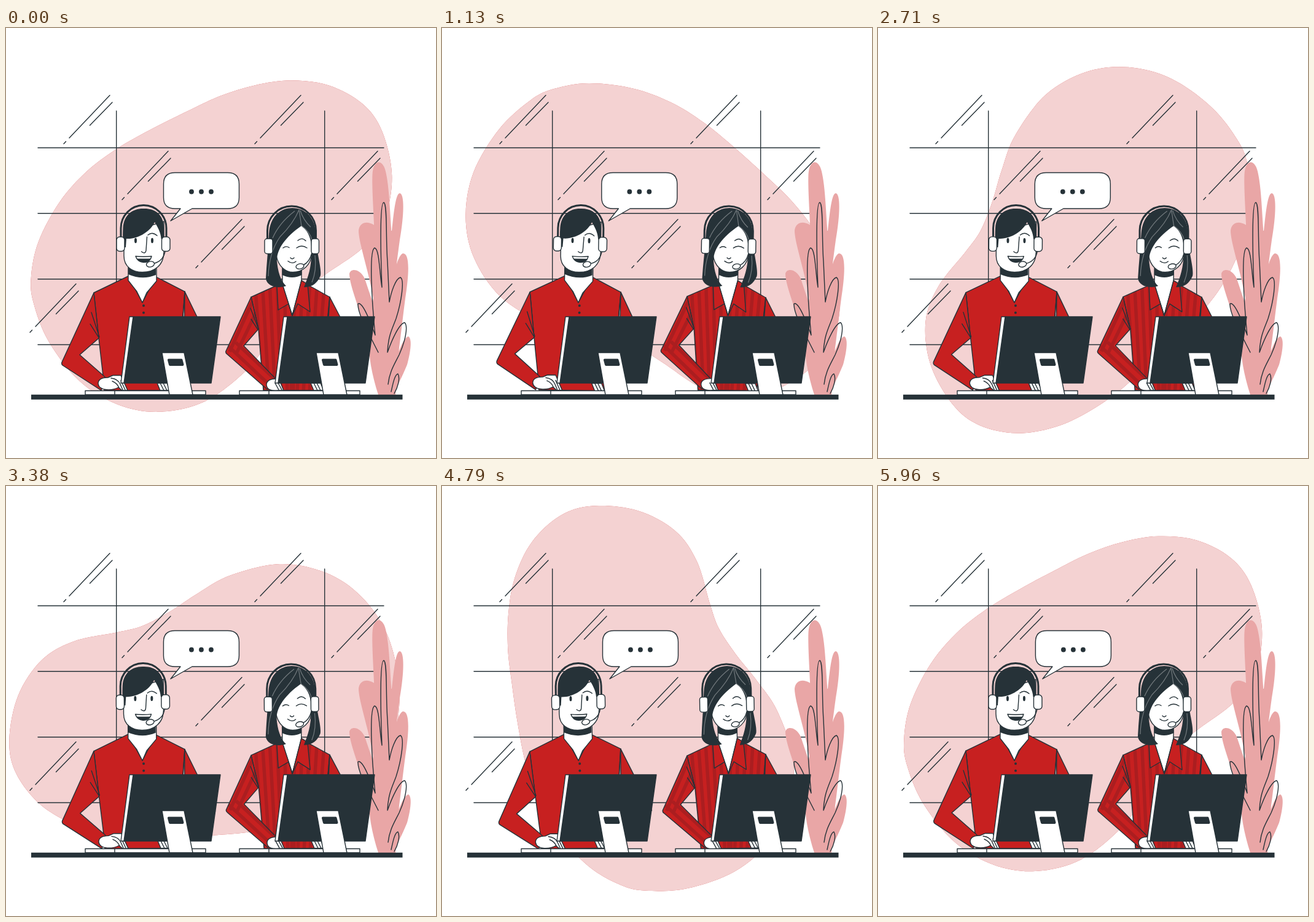
These frames come from a looping animation (700x700 px, 6000 ms). An HTML page:

```html
<!DOCTYPE html>
<html lang="en">
<head>
<meta charset="utf-8">
<title>Support desk</title>
<style>
html, body { margin: 0; height: 100%; overflow: hidden; background: #fff; }
svg { display: block; width: 100vw; height: 100vh; }
.line { fill: none; stroke: #263238; stroke-width: 1.4; stroke-linecap: round; stroke-linejoin: round; }
.white { fill: #fff; }
.red { fill: #c72020; }
.dark { fill: #263238; }
.pink { fill: #e9a6a6; }
.stripe { fill: none; stroke: #ab1e20; stroke-width: 5.5; }
.shine { fill: none; stroke: #737a7e; stroke-width: 1.2; }
.band { stroke-width: 3; }
.slot { stroke-width: 4; }
</style>
</head>
<body>
<svg viewBox="0 0 700 700">
  <defs>
    <path id="glint" class="line" d="M169 109.500L103 179M97.500 184.800L94 188.500M173 121L136.500 158.500"/>
    <g id="desk">
      <path class="line white" d="M129 590.500H325V597H129ZM177 590.500V597"/>
      <path class="line white" d="M201 470H208L193 578H187Z"/>
      <path class="line dark" d="M207 470H349L334 578H192Z"/>
      <path class="line white" d="M254 528.500H290L304 597H266Z"/>
      <path class="line dark slot" d="M265 540.500H285.500L287.500 548H267Z"/>
    </g>
    <path id="torso" d="M450 414L441 419L399 438L411 490L419 590H515L524 470L527 438L491 418L481 411L466 468Z"/>
    <path id="arm" d="M399 438L358 526Q357 529 360 531L425 588L440 572L387 517.500L411 490Z"/>
    <clipPath id="inTorso"><use href="#torso"/></clipPath>
    <clipPath id="inArm"><use href="#arm"/></clipPath>
  </defs>

  <g id="blob">
    <path class="red"/>
    <path class="white" opacity=".8"/>
  </g>

  <path class="line" d="M52 195H615M52 301.800H615M52 408.700H615M52 515.500H615M179.700 135V480M518.700 135V480"/>
  <use href="#glint"/>
  <use href="#glint" x="311"/>
  <use href="#glint" x="95" y="91"/>
  <use href="#glint" x="436" y="91"/>
  <use href="#glint" x="215" y="202"/>
  <use href="#glint" x="-55" y="307"/>

  <g id="plant">
    <path class="pink" d="M606 597C588 540 586 500 598 440L604 330L628 330L634 400L640 520L634 597Z
      M603 440C602 340 595 270 596.500 238C598 212 615 212 619 238C624 262 625 300 628 340V440Z
      M626 350C630 315 633 269 641 269C649 270 648 305 641 345C637 375 635 390 632 420L620 440Z
      M600 450C592 400 574 350 574 330C576 313 594 313 606 327L620 440Z
      M604 560C590 490 559 425 559 400C561 390 577 392 584 408L598 450Z
      M620 500C624 430 634 372 646 367C658 366 656 402 650 440C646 470 643 500 638 535Z
      M622 597C632 540 645 505 655 502C662 506 658 530 653 548C645 568 635 585 632 597Z"/>
    <path class="line" d="M612 422C610 370 608 284 615 284C621 286 618 340 621 380L624 446
      C627 430 634 408 642 406C649 409 644 445 635 473C630 487 622 500 621 528
      C628 508 640 481 649 479.500C655 486 650 510 640 532C632 548 624 560 622 580
      M601 500C595 440 591 362 600 358C608 359 608 400 612 422
      M606 528C592 500 572 465 573 449C580 444 594 480 601 500
      M627 592C630 578 633 564 638 563C642 570 638 585 632 595"/>
  </g>

  <g id="bubble">
    <path class="line white" d="M275 235.500H361Q379.500 235.500 379.500 254V276Q379.500 294 361 294H303L268 314L284 294H275Q256.500 294 256.500 276V254Q256.500 235.500 275 235.500Z"/>
    <circle class="dark" cx="302" cy="266.500" r="3.900"/>
    <circle class="dark" cx="318" cy="266.500" r="3.900"/>
    <circle class="dark" cx="334" cy="266.500" r="3.900"/>
  </g>

  <g id="man">
    <path class="line red" d="M291 429L340 530L266 588L270 560L290 520Z"/>
    <path class="line red" d="M199 404L143 431L151 505L158 566L160 590H284L288 470L291 429L244 405L222 447Z"/>
    <path class="line red" d="M143 431L91 544Q90 547 92 549L155 590L161 568L120 532L151 505Z"/>
    <path class="line" d="M139 463L152 503M137 482L151 504M291 429L288 470"/>
    <path class="line white" d="M199 385V411L213 429L222 447L229 431L245 412V385Z"/>
    <path class="dark" d="M199 387Q222 404 244 390V402Q222 411 199 401Z"/>
    <circle class="dark" cx="224" cy="452" r="2"/>
    <circle class="dark" cx="224" cy="463.500" r="2"/>
    <path class="line white" d="M192 335V371C192 389 206 397.500 222 397.500C242 397.500 257 386 257 364V315Z"/>
    <path class="dark" d="M191 357C190 345 190 335 190.500 325C192 304 206 294 223 294C245 293 257 306 257 326V348L252.500 343C252 333 247 324 242 316C236 330 216 344 196 343L195 357Z"/>
    <path class="line band" d="M187 342V326A37 37.500 0 0 1 261 326V342"/>
    <rect class="line white" x="180" y="340" width="13" height="23.500" rx="5"/>
    <rect class="line white" x="253.500" y="340" width="13.500" height="23.500" rx="5"/>
    <ellipse class="dark" cx="211" cy="346" rx="2" ry="4.200"/>
    <ellipse class="dark" cx="238" cy="346" rx="2" ry="4.200"/>
    <path class="line" d="M231 337Q238 331 246 338M229.500 340L228 362Q227 369 220.500 364M242 383Q256 379 259 363.500"/>
    <path class="line white" d="M211 371.500Q224 373 237 371.500Q235 381.500 224 381.500Q214 381 211 371.500Z"/>
    <path class="dark" d="M213 375.500H235.500Q233 381.500 224 381.500Q216 381.500 213 375.500Z"/>
    <ellipse class="line white" cx="235" cy="384.500" rx="6.500" ry="4.500" transform="rotate(-12 235 384.500)"/>
    <path class="line white" d="M150 579C150 572 157 569 166 569L174 565.500H187L198 590H189L183 585C174 590 152 592 150 579Z"/>
    <path class="line" d="M171 570Q182 571 186 580L190 589M173 575Q181 578 184 586M187 574L194 589"/>
    <path class="line white" d="M246 578H262L267 590H251Z"/>
    <path class="line" d="M251 578L257 590M256 578L262 590"/>
  </g>

  <g id="woman">
    <path class="line red" d="M527 438L574 528L508 588L520 560Z"/>
    <use href="#torso" class="red"/>
    <path id="torsoStripes" class="stripe" clip-path="url(#inTorso)"/>
    <use href="#torso" class="line"/>
    <use href="#arm" class="red"/>
    <path class="stripe" clip-path="url(#inArm)" d="M393 432L352 522M405 437L364 527M417 442L374 532M352 526L422 592M362 518L432 584M374 512L440 574"/>
    <use href="#arm" class="line"/>
    <path class="line" d="M398 456L411 490M399 474L410 491M527 438L524 470"/>
    <path class="line white" d="M450 390V418L466 468L481 411V390Z"/>
    <path class="line red" d="M441 419L450 417L466 468L460 449L443 459Z"/>
    <path class="line red" d="M481 411L491 417L495 462L475 449L466 468Z"/>
    <path class="dark" d="M449.500 388H481.500V402Q466 410 449.500 402Z"/>
    <path class="line white" d="M440 350V370C443 388 455 397.500 467 397.500C483 397.500 497 386 498 366V335L481 318Z"/>
    <path class="dark" d="M481 322C455 340 441 360 441 378C442 395 447 412 456 420C440 425 425 420 423 408C424 385 427 360 428 335C430 305 448 293 466 293C488 293 504 310 504 335C505 365 514 390 512 403C506 418 496 422 485 422C492 405 497 390 497 368C498 350 496 334 481 322Z"/>
    <path class="shine" d="M470 298Q445 317 434 342M477 296Q468 318 446 340Q428 366 427 404M477 296L481 322Q495 332 498 345M479 297Q484 313 496 324M503 370Q506 395 498 414"/>
    <path class="line band" d="M425.500 344V330A39.500 40 0 0 1 504.500 330V344"/>
    <rect class="line white" x="421" y="343" width="13" height="24.500" rx="4"/>
    <rect class="line white" x="497" y="343" width="12.500" height="24.500" rx="4"/>
    <path class="line" d="M451 358Q456 354 461 357.500M473 358Q481 352 490 358M475 346Q482 340 488 346.500M463 374Q466 377.500 469 374M459 379.500Q466 385 472 380M484 386Q494 381 497.500 367.500"/>
    <ellipse class="line white" cx="478.500" cy="388" rx="6.500" ry="4.200" transform="rotate(-12 478.500 388)"/>
    <path class="line white" d="M424 581C424 573 432 571 441 571L447 578L452 590H443C434 591 425 590 424 581Z"/>
    <path class="line" d="M438 578L444 589M442 576L449 589"/>
    <path class="line white" d="M496 578H512L517 590H501Z"/>
    <path class="line" d="M501 578L507 590M506 578L512 590"/>
  </g>

  <use href="#desk"/>
  <use href="#desk" x="251"/>
  <rect class="dark" x="41" y="596.800" width="604.500" height="8"/>
</svg>
<script>
const $ = id => document.getElementById(id);
const LOOP = 6000;

// closed smooth curve through a few points
function smooth(points) {
  const n = points.length, at = i => points[(i + n) % n];
  let d = `M${points[0]}`;
  for (let i = 0; i < n; i++) {
    const [a, b, c, e] = [at(i - 1), at(i), at(i + 1), at(i + 2)];
    const c1 = b.map((v, k) => v + (c[k] - a[k]) / 6);
    const c2 = c.map((v, k) => v - (e[k] - b[k]) / 6);
    d += `C${c1} ${c2} ${c}`;
  }
  return d + 'Z';
}

const outline = smooth([
  [463, 85], [525, 93], [580, 123], [612, 168], [628, 240], [616, 309], [580, 358],
  [521, 400], [488, 426], [457, 465], [427, 511], [390, 559], [324, 608], [250, 625],
  [182, 613], [120, 575], [70, 511], [45, 448], [41, 405], [53, 348], [87, 284],
  [130, 235], [180, 197], [240, 163], [300, 133], [350, 110], [405, 93]
]);
for (const path of $('blob').children) path.setAttribute('d', outline);

let stripes = '';
for (let i = 0; i < 6; i++) {
  stripes += `M${405 + i * 12} 410L${418 + i * 10} 595`;
  stripes += `M${531 - i * 12} 410L${514 - i * 10} 595`;
}
$('torsoStripes').setAttribute('d', stripes);

const shake = [0, -1, 2, -4, 4, -4, 4, -4, 2, -1, 0];
function shakeAt(phase) {
  const p = phase * 10, i = Math.floor(p);
  return shake[i] + (shake[i + 1] - shake[i]) * (p - i);
}

const move = (id, value) => $(id).setAttribute('transform', value);

function draw(now) {
  const t = now % LOOP;
  const phase = (t + Math.min(t, 15)) / LOOP % 1;  // brief lead-in at the loop start
  const sway = Math.sin(phase * 2 * Math.PI);
  move('blob', `rotate(${phase * 360} 334.5 354.7)`);
  move('bubble', `translate(${1.3 * shakeAt(phase * 2 % 1)})`);
  move('man', `rotate(${sway} 220 440)`);
  move('woman', `rotate(${sway} 465 440)`);
  requestAnimationFrame(() => draw(performance.now() - start));
}
const start = performance.now();
draw(0);
</script>
</body>
</html>
```
